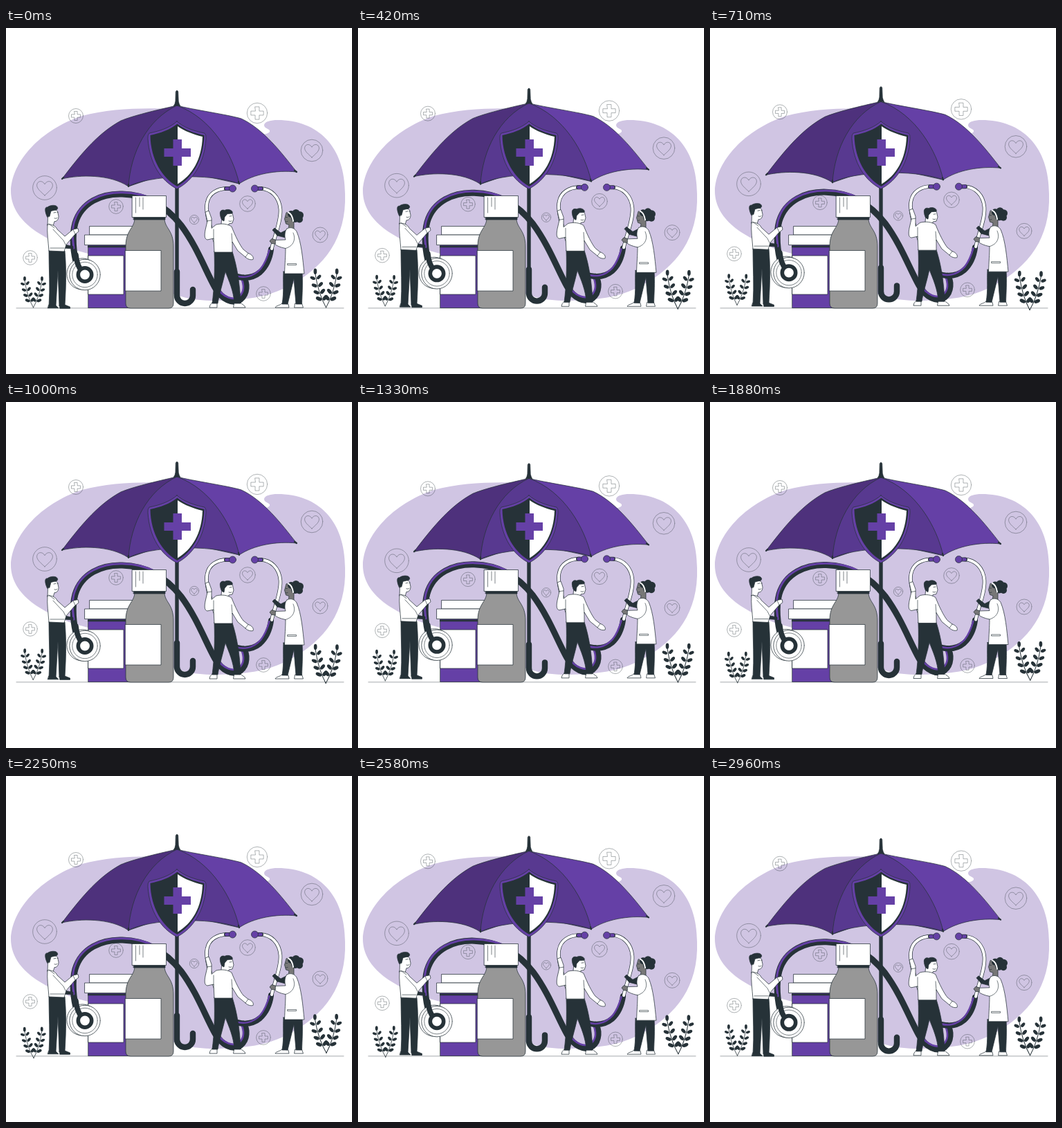
Write an HTML page with a canvas that moves like this. It is 500x500 px and loops after 3000 ms.

```html
<!DOCTYPE html>
<html lang="en">
<head>
<meta charset="utf-8">
<title>Health cover</title>
<style>
  html, body { margin: 0; width: 100%; height: 100%; overflow: hidden; background: #fff; }
  canvas { display: block; width: 500px; height: 500px; }
</style>
</head>
<body>
<canvas id="stage"></canvas>
<script>
const canvas = document.getElementById('stage');
const ctx = canvas.getContext('2d');
const ratio = window.devicePixelRatio || 1;
canvas.width = canvas.height = 500 * ratio;

const LOOP = 3000, FPS = 24, LIFT = 6;
const INK = '#263238', PURPLE = '#6540a6', MID = '#583990', DEEP = '#4e317c';
const LAVENDER = '#d0c5e3', SKIN = '#777', GREY = '#979797';

function shape(d, fill, stroke = INK, width = 0.75) {
  const p = new Path2D(d);
  if (fill) { ctx.fillStyle = fill; ctx.fill(p); }
  if (stroke) { ctx.strokeStyle = stroke; ctx.lineWidth = width; ctx.stroke(p); }
}
const line = (d, stroke = INK, width = 0.75) => shape(d, null, stroke, width);

function disc(x, y, r, fill, stroke = INK, width = 0.75) {
  ctx.beginPath();
  ctx.arc(x, y, r, 0, 7);
  if (fill) { ctx.fillStyle = fill; ctx.fill(); }
  if (stroke) { ctx.strokeStyle = stroke; ctx.lineWidth = width; ctx.stroke(); }
}

function at(x, y, draw) {
  ctx.save();
  ctx.translate(x, y);
  draw();
  ctx.restore();
}

// Triangle wave: 0 -> 1 -> 0
const bounce = (t, period) => 1 - Math.abs(1 - 2 * (t % period) / period);
// Quarter-shifted triangle: 0 -> 1 -> -1 -> 0
const swing = t => 2 * bounce(t + LOOP / 4, LOOP) - 1;

function backdrop() {
  shape('M7 235C9 192 50 147 110 127C150 116 200 115 240 117C290 121 325 150 366 153' +
    'C376 154 382 152 381 148C379 145 373 145 373 140C374 135 383 133 392 133' +
    'C452 133 490 172 490 240C492 303 461 345 410 372C380 389 345 394 295 394' +
    'C230 392 215 365 170 346C150 332 125 328 100 321C55 305 7 280 7 235Z', LAVENDER, null);
}

const PLUSES = [[101, 127, 10.5], [363, 123, 14.7], [159, 258, 10.3], [35, 332, 10.3], [372, 384, 10.3]];
const HEARTS = [[56, 231, 17.3], [442, 177, 15.8], [349, 254, 11.3], [272, 277, 6.7], [454, 299, 11]];

function badges() {
  const tone = 'rgba(38,50,56,.62)';
  for (const [x, y, r] of PLUSES) at(x, y, () => {
    const a = r * 0.2, b = r * 0.62;
    disc(0, 0, r, null, tone, 0.6);
    line(`M${-a} ${-b}H${a}V${-a}H${b}V${a}H${a}V${b}H${-a}V${a}H${-b}V${-a}H${-a}Z`, tone, 0.6);
  });
  for (const [x, y, r] of HEARTS) at(x, y, () => {
    disc(0, 0, r, null, tone, 0.6);
    ctx.scale(r / 10, r / 10);
    line('M0 6.3C-3 3.5 -6.6 .8 -6.6 -2.2C-6.4 -6 -1.8 -6.6 0 -3C1.8 -6.6 6.4 -6 6.6 -2.2C6.6 .8 3 3.5 0 6.3Z',
      tone, 6 / r);
  });
}

function umbrella() {
  line('M247 215V352', INK, 5.4);
  line('M247 352V386.5A11.5 11.5 0 0 0 270 386.5V378', INK, 8.4);
  shape('M247 112C215 119 183 127 166 134C135 151 112 177 81 218C107 212 150 211 177 229L247 205Z', DEEP);
  shape('M247 112C270 118 320 125 340 131C372 146 398 180 420 208C390 205 358 211 337 225L247 205Z', PURPLE);
  shape('M247 112C204 132 180 180 177 229C206 213 294 209 337 225C328 184 298 130 247 112Z', MID);
  for (const [x, y, dx, dy] of [[81, 218, 2, -2], [177, 229, 0, -3], [337, 225, -1, -3], [420, 208, -3, -2]])
    line(`M${x} ${y}l${dx} ${dy}`, INK, 2.2);
  shape('M245.4 92Q247 88.6 248.7 92L249.2 106Q250 110 252 113Q247 111 242 113Q244.5 110 244.9 106Z', INK);
}

function shield() {
  shape('M247 135C237 144 222 149 207 152Q204.5 154 205 160C207 195 224 221 247 232.5' +
    'C270 221 287 195 289 160Q289.5 154 287 152C272 149 257 144 247 135Z', PURPLE, INK, 0.7);
  shape('M247.5 138.5C237 147 223 152 208.5 155C209 190 226 217 247.5 229C269 217 286 190 286.5 155C272 152 258 147 247.5 138.5Z', INK, null);
  shape('M248 142C258 149 270 153.5 284 157C283 190 269 213 248 225.5Z', '#fff', null);
  shape('M241.5 161H254V174H267V186H254V199H241.5V186H228.5V174H241.5Z', PURPLE, null);
}

function frond(side) {
  const cx = 9 * side, cy = -16, tx = 12.5 * side, ty = -39;
  line(`M0 0Q${cx} ${cy} ${tx} ${ty}`, INK, 0.8);
  const leaf = (x, y, angle, size) => {
    ctx.beginPath();
    ctx.ellipse(x, y, 3.5 * size, 2 * size, angle, 0, 7);
    ctx.fillStyle = INK;
    ctx.fill();
  };
  for (let i = 0; i < 4; i++) {
    const k = 0.26 + i * 0.2, size = 1.04 - i * 0.05;
    const x = 2 * cx * k * (1 - k) + tx * k * k;
    const y = 2 * cy * k * (1 - k) + ty * k * k;
    leaf(x + 4 * side, y - 1.4, -0.4 * side, size);
    leaf(x - 3.2 * side, y - 2.6, 0.85 * side, size);
  }
  leaf(tx, ty - 2.8, 1.57, 0.95);
}

function plants(angle) {
  at(254, 377, () => {
    ctx.rotate(angle * Math.PI / 180);
    for (const [x, y, s] of [[-214.5, 27, 1], [208.5, 27, 1.25]]) at(x, y, () => {
      ctx.scale(s, s);
      frond(-1);
      frond(1);
    });
  });
}

function tubes() {
  line('M103 345C97 325 95 300 100 282C109 252 138 239 168 240C205 241 232 258 253 285' +
    'C276 316 288 350 302 375C312 392 328 400 339 392C349 384 349 368 343 361', INK, 9);
  line('M98 318C95.5 300 96 285 100 276C109 250 138 237.3 168 237.8C187 238 205 243 217 250', PURPLE, 3);
  line('M303 372C313 390 330 395 338 387C344 381 344 371 340 361', PURPLE, 2.6);
  line('M321 348C328 364 354 364 367 353C377 344 381 334 383 320', INK, 8.2);
  line('M328 356C342 363 357 360 368 348C375 339 378 330 380.5 321', PURPLE, 2.5);
  for (const d of [
    'M312 334C300 303 287 270 290.5 253C293 239 305 232 320 231.7',
    'M384 319C388 300 397.5 280 396.5 262C395 244 383 232.5 368 232'
  ]) {
    line(d, INK, 5.4);
    line(d, '#fff', 4);
  }
  for (const [x, dir] of [[327.5, -1], [359.5, 1]]) {
    line(`M${x} 232h${dir * 9.5}`, INK, 6);
    line(`M${x} 232h${dir * 9}`, PURPLE, 4.6);
    disc(x, 232, 5, PURPLE);
  }
}

function jars() {
  shape('M119 314H180V404.5H119Z', PURPLE);
  line('M119 316H180', INK, 2.4);
  shape('M119 329H170V385H119Z', '#fff');
  shape('M121 286.5H190V299H121Z', '#fff');
  shape('M114 299H190V313.5H114Z', '#fff');
  shape('M186 276H229C230 290 242 292 242 316V398Q242 405 235 405H180Q173 405 173 398V316C173 292 185 290 186 276Z', GREY);
  shape('M172.5 321.5H224V380H172.5Z', '#fff');
  shape('M184.5 272H230V277H184.5Z', INK);
  shape('M182.5 242.5H231.5V273.5H182.5Z', '#fff');
  line('M187.5 245V267M193 245V258M198 245V262', INK, 0.6);
}

function chestpiece() {
  disc(110.5, 355.5, 22.6, '#fff');
  disc(114, 356.5, 22.2, '#fff');
  disc(114, 356.5, 18.2, '#fff', INK, 0.6);
  line('M101 328C102 338 104 345 109 350', INK, 7.6);
  disc(114, 356.5, 9.7, '#fff', INK, 5.6);
}

function helper() {
  shape('M82 312.5L97 315.5V319L83 318Z', INK);
  shape('M62 322L85 322C87 345 87 368 85 401L77 402L75 350L72 402H62C64 375 62 350 62 322Z', INK);
  shape('M62 400H71L76 404.8H60.5Z', INK);
  shape('M77.5 400H85L92.5 403V405.3H78Z', INK);
  shape('M61 266C66 262 73 262 74.5 265L76 272C76 277 73 280 70 279.5L68 286H60L60.5 272Z', '#fff');
  shape('M60 284C66 283 72 286 74 291L85 301L97 291L104 289.5L105 294L99 299L87 313L84 323L62 322C61 308 59 296 60 284Z', '#fff');
  line('M62 283L70 289M68 291L83 307L86 313M64 318H84M97 291L100 298', INK, 0.65);
  shape('M59.5 273C55.5 264 56 258 60 259C63 256 72 255 74 258.5C76 261 73 263.5 71 263L65 264.5L63 272Z', INK);
  line('M69 267l3 -.6M74 266.6l1 -.2M70 275Q73 276 74 274.5', INK, 0.7);
}

function visitor() {
  shape('M298 397H305V404H294Q294 400 298 397Z', '#fff');
  shape('M330 397H339C341 400 345 400 346 404H329Z', '#fff');
  shape('M301 323H327C334 345 338 370 339 398H330C329 380 322 365 317 352C313 370 308 385 306 398H298C301 375 302 350 301 323Z', INK);
  shape('M313 268C318 265 326 265 327.5 269L329 276L327 282L322 283L321 288L311 286Z', '#fff');
  shape('M304 284C312 282 320 283 326 287C331 300 338 314 343 320L350 325.5C355 327 358.5 331 357 334.5' +
    'C353 335.5 349 334 346 331L335 322L327 309V324H301L300 304L291 306C286 305 287 298 288 292L291 279L288 266L293 264L297 275V289Z', '#fff');
  line('M300 291V305M326 297L327 310M290 279L297 278M346 331L350 325.5', INK, 0.65);
  shape('M310 272C307.5 264 312 262 316 263.5C321 260.5 329 264 327 268L320 268.5L316 273L315 279C312 278 310.5 276 310 272Z', INK);
  line('M323 272l3 -.4M322 279q2 1 4 0', INK, 0.7);
}

function doctor() {
  shape('M399 398L408 399L409 404H389C390 401 396 401 399 398Z', '#fff');
  shape('M418 398H427.5L429.5 404H417Z', '#fff');
  shape('M401 352H428C429 370 428 385 427.5 399H419L416 362L407 399H399C402 380 400 368 401 352Z', INK);
  shape('M404 303L392 300L385 292L388 289L397 296L405 292Z', INK);
  shape('M405 267L402.5 276L404.5 283L409 284.5L408 291L416 291L416 268Z', SKIN);
  shape('M406 290C411 287 417 289 420 294C427 310 429 335 431 355H402.5C403 340 404 330 404 318.5' +
    'C396 317 390 314 388 312L389 306.5L404 306C402 300 403 293 406 290Z', '#fff');
  shape('M389 306L384 304.5L381 308L384 311.5L389 312Z', SKIN);
  line('M415 296C419 305 416 315 404 318.5M407 340.5H419.5V342.5H407Z', INK, 0.65);
  for (const [x, y, r] of [[412, 269, 5], [419, 267.5, 5.5], [424.5, 270.5, 5.5], [418, 275, 6], [424, 276.5, 5]])
    disc(x, y, r, INK, null);
  line('M408 266.5C412 268 414 273 415 279', '#fff', 2);
  line('M404.5 273.5l2 0M404.5 280l2.5 -.5', INK, 0.7);
}

function render(t) {
  ctx.setTransform(ratio, 0, 0, ratio, 0, 0);
  ctx.lineJoin = ctx.lineCap = 'round';
  ctx.fillStyle = '#fff';
  ctx.fillRect(0, 0, 500, 500);
  const hover = -LIFT * bounce(t, LOOP / 2);
  const drift = -LIFT * bounce(t, LOOP);

  backdrop();
  at(0, hover, badges);
  line('M15 404.8H488', '#90969a', 0.8);
  plants(swing(t));
  at(0, hover, umbrella);
  shield();
  at(0, drift, tubes);
  jars();
  at(0, drift, () => {
    chestpiece();
    helper();
    visitor();
    doctor();
  });
}

const start = performance.now();
function tick() {
  const t = (performance.now() - start) % LOOP;
  render(Math.floor(t * FPS / 1000) * 1000 / FPS);
  requestAnimationFrame(tick);
}
tick();
</script>
</body>
</html>
```
